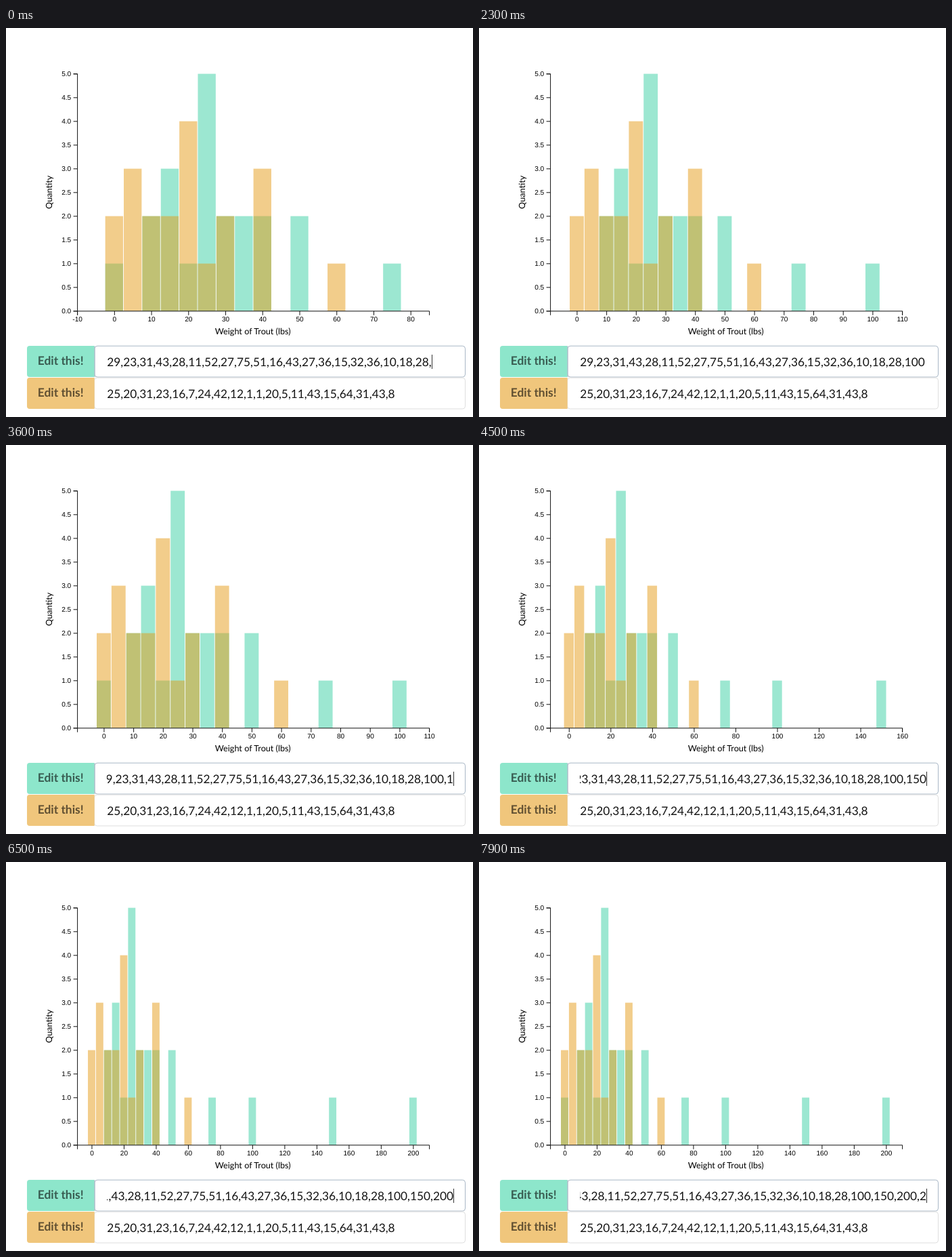
An HTML page that plays this animation: 690 px wide and 574 px high, repeating every 8000 ms.

```html
<!DOCTYPE html>
<html lang="en">
<head>
<meta charset="utf-8">
<title>Histogram</title>
<style>
  html, body { margin: 0; width: 100%; height: 100%; overflow: hidden; background: #fff; }
  svg { display: block; width: 690px; height: 574px; }
  text { white-space: pre; text-rendering: geometricPrecision; }
  .tick { font: 10.1px "Liberation Sans", Arial, sans-serif; fill: #000; }
  .title { font: 12.65px Lato, sans-serif; fill: #000; text-anchor: middle; }
  .label { font: bold 17.4px Lato, sans-serif; fill: rgba(0, 0, 0, .6); text-anchor: middle; }
  .value { font: 17.3px Lato, sans-serif; fill: #141414; }
  .axis { fill: none; stroke: #111; }
</style>
</head>
<body>
<svg id="stage" viewBox="0 0 690 574" xmlns="http://www.w3.org/2000/svg">
  <defs><clipPath id="field"><rect x="149" y="470" width="513" height="44"/></clipPath></defs>
  <g id="bars"></g>
  <g id="xAxis"></g>
  <g id="yAxis"></g>
  <text class="title" x="364.7" y="452.4">Weight of Trout (lbs)</text>
  <text class="title" transform="translate(67.8 242.3) rotate(-90)">Quantity</text>

  <rect x="131" y="469.2" width="547.5" height="45.8" rx="4" fill="#fff" stroke="#a9b7c6"/>
  <path d="M130.7 469H35a4 4 0 0 0-4 4v38a4 4 0 0 0 4 4h95.7z" fill="#8de6cb"/>
  <path d="M131 469.5V515" stroke="#a9b7c6"/>
  <text class="label" x="80.7" y="497.2">Edit this!</text>

  <rect x="130.5" y="516.2" width="548" height="45.8" rx="4" fill="#fff" stroke="#dedede"/>
  <path d="M130.7 516H35a4 4 0 0 0-4 4v38a4 4 0 0 0 4 4h95.7z" fill="#f0c67c"/>
  <text class="label" x="80.7" y="544.3">Edit this!</text>
  <text class="value" id="fixed" x="149.3" y="545.5"></text>

  <g clip-path="url(#field)">
    <text class="value" id="typed" y="498.9"></text>
    <rect id="caret" y="482" width="1" height="21" fill="#333"/>
  </g>
</svg>
<script>
const LOOP = 8000, LEFT = 105.6, TOP = 67.6, WIDTH = 520, HEIGHT = 350, BIN = 5, MAX = 5;
const BASE = TOP + HEIGHT + .2;
const start = "29,23,31,43,28,11,52,27,75,51,16,43,27,36,15,32,36,10,18,28,";
const other = "25,20,31,23,16,7,24,42,12,1,1,20,5,11,43,15,64,31,43,8";
const added = "100,150,200,2";
// moment each added character is typed
const keys = [600, 1400, 1500, 2800, 3500, 4300, 4400, 4900, 6300, 6400, 6500, 7300, 7800];

const el = id => document.getElementById(id);
const parse = s => s.split(",").map(Number);
const yPos = n => TOP + HEIGHT * (1 - n / MAX);

function count(values) {
  const bins = new Map();
  for (const v of values) {
    const b = Math.floor(v / BIN) * BIN;
    bins.set(b, (bins.get(b) || 0) + 1);
  }
  return bins;
}

function drawBars(values, x, color) {
  const w = x(BIN) - x(0) - 1;
  return [...count(values)].map(([b, n]) =>
    `<rect x="${x(b - BIN / 2)}" y="${yPos(n)}" width="${w}" height="${n / MAX * HEIGHT}" fill="${color}" opacity=".5"/>`
  ).join("");
}

function drawChart(text) {
  const a = parse(text), b = parse(other), all = a.concat(b);
  const lo = Math.min(...all) - 10, hi = Math.max(...all) + 10;
  const x = v => LEFT + (v - lo) / (hi - lo) * WIDTH;
  el("bars").innerHTML = drawBars(a, x, "#3bcfa3") + drawBars(b, x, "#e59b19");

  const step = hi - lo > 141 ? 20 : 10;
  let path = `M${LEFT} ${BASE + 6}v-6h${WIDTH}v6`, labels = "";
  for (let v = Math.ceil(lo / step) * step; v <= hi; v += step) {
    path += `M${x(v)} ${BASE}v6`;
    labels += `<text class="tick" text-anchor="middle" x="${x(v)}" y="433.4">${v}</text>`;
  }
  el("xAxis").innerHTML = `<path class="axis" d="${path}"/>${labels}`;
}

function drawYAxis() {
  let path = `M${LEFT - 6} ${BASE - HEIGHT}h6v${HEIGHT}h-6`, labels = "";
  for (let n = 0; n <= MAX; n += .5) {
    const y = BASE - n / MAX * HEIGHT;
    path += `M${LEFT} ${y}h-6`;
    labels += `<text class="tick" text-anchor="end" x="96.2" y="${y + 3.1}">${n.toFixed(1)}</text>`;
  }
  el("yAxis").innerHTML = `<path class="axis" d="${path}"/>${labels}`;
}

let shown = null;

function render(t) {
  const n = keys.filter(k => k <= t).length;
  const text = start + added.slice(0, n);
  const typed = el("typed");
  if (text !== shown) {
    shown = text;
    typed.textContent = text;
    drawChart(text);
  }
  const w = typed.getComputedTextLength();
  const x = Math.min(149.3, 661 - w);
  typed.setAttribute("x", x);

  const last = n ? keys[n - 1] : -100;
  const on = Math.floor((t - last) / 500) % 2 === 0;
  el("caret").setAttribute("x", Math.min(661, Math.round(x + w)));
  el("caret").setAttribute("visibility", on ? "visible" : "hidden");
}

el("fixed").textContent = other;
drawYAxis();

function frame() {
  render(performance.now() % LOOP);
  requestAnimationFrame(frame);
}
frame();
</script>
</body>
</html>
```
